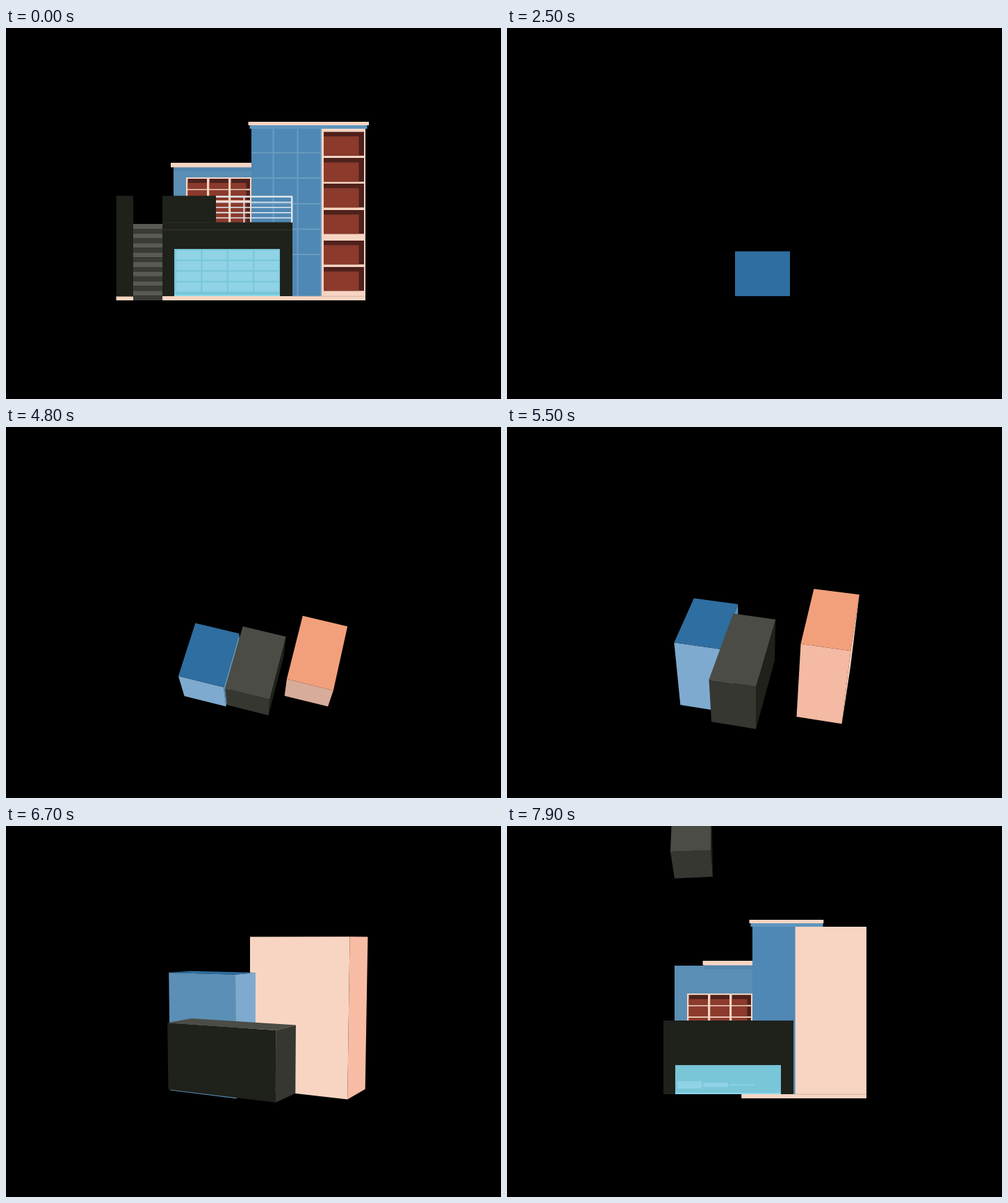
Recreate the animation shown at these times as an HTML page with a canvas. Size 712 by 534 pixels, loop 8000 ms.

```html
<!DOCTYPE html>
<html lang="en">
<head>
<meta charset="utf-8">
<title>House assembly</title>
<style>
  html, body { margin: 0; width: 100%; height: 100%; overflow: hidden; background: #000; }
  canvas { display: block; }
</style>
</head>
<body>
<canvas id="stage" width="712" height="534"></canvas>
<script>
const ctx = document.getElementById('stage').getContext('2d');
const LOOP = 8000, CUT = 1100, SPLIT = 2800, ORBIT = 3700, DETAIL = 7380;
const CX = 356, CY = 267, EYE = 119;
const PEACH = '#f8d5c3', BLUE = '#5b8fb5', TALL = '#4f88b4', DARK = '#1f211b';

const clamp = v => Math.max(0, Math.min(1, v));
const easeOut = v => 1 - (1 - clamp(v)) ** 2;
const smooth = v => (v = clamp(v), v * v * (3 - 2 * v));

function rect(x, y, w, h, color) {
  ctx.fillStyle = color;
  ctx.fillRect(x, y, w, h);
}

function poly(points, color) {
  ctx.fillStyle = color;
  ctx.beginPath();
  points.forEach(([x, y]) => ctx.lineTo(x, y));
  ctx.fill();
}

// Pose keys; camera: yaw, pitch, extra distance, perspective
const times = [3700, 4800, 5300, 6100, 6700, 7200];
const camera = [
  [90, 90, -29, 1], [104.5, 65.6, 177, 1], [103, 47, 240, 1],
  [91, 19.5, 303, 1], [28, 6, 133, 1], [0, 0, 0, 0]
];
// Boxes: x, width, z, depth, height
const blue = {
  top: '#2f6ea0', side: '#7faacf', front: BLUE,
  keys: [[53.5, 66.5, 23, 79, 90], [39, 98, 15, 77, 108], [25, 115, 24, 80, 140],
    [5, 130, 29, 80, 182], [-90, 118, 46, 63, 185], [-115, 112, 46, 63, 185]]
};
const gray = {
  top: '#4b4c45', side: '#363731', front: DARK,
  keys: [[53.5, 66.5, -51, 79, 90], [19, 115, -62, 76, 94], [0, 160, -45, 79, 102],
    [-25, 205, -15, 80, 112], [-97, 189, 35.5, 69, 106], [-131, 187, 36, 69, 106]]
};
const peach = {
  top: '#f2a07b', side: '#f8bca4', front: PEACH,
  keys: [[53.5, 66.5, -125, 79, 90], [-27, 119, -160, 79, 92], [-25, 140, -188, 80, 150],
    [-3, 164, -141, 80, 240], [13, 164, -44, 80, 240], [-3, 164, -44, 80, 241]]
};

// Smooth spline through the keys, at rest at both ends
function sample(keys, t) {
  const last = times.length - 1;
  if (t >= times[last]) return keys[last];
  let i = 0;
  while (t >= times[i + 1]) i++;
  const span = times[i + 1] - times[i], u = (t - times[i]) / span;
  return keys[i].map((a, c) => {
    const b = keys[i + 1][c];
    const slope = n => n === 0 || n === last ? 0 :
      (keys[n + 1][c] - keys[n - 1][c]) / (times[n + 1] - times[n - 1]) * span;
    return a + (b - a) * u * u * (3 - 2 * u) +
      slope(i) * u * (1 - u) ** 2 - slope(i + 1) * u * u * (1 - u);
  });
}

function projector([yaw, pitch, far, persp]) {
  const a = yaw * Math.PI / 180, p = pitch * Math.PI / 180;
  const sa = Math.sin(a), ca = Math.cos(a), sp = Math.sin(p), cp = Math.cos(p);
  return (x, y, z) => {
    const u = x * ca - z * sa, n = x * sa + z * ca, h = y - EYE;
    const s = 1 / (1 + (far - h * sp - n * cp) * persp / 1000);
    return [CX + u * s, CY - (h * cp - n * sp) * s];
  };
}

// Corner bits: 1 = x, 2 = y, 4 = z
const faces = [['front', [1, 0, 2, 3]], ['front', [4, 5, 7, 6]], ['side', [5, 1, 3, 7]], ['top', [6, 7, 3, 2]]];

function drawBox(box, t, project) {
  const [x, w, z, d, h] = sample(box.keys, t);
  const corner = i => project(x + (i & 1 ? w : 0), i & 2 ? h : 0, z + (i & 4 ? d : 0));
  for (const [name, ids] of faces) {
    const pts = ids.map(corner);
    const area = pts.reduce((sum, [px, py], i) => {
      const [qx, qy] = pts[(i + 1) % 4];
      return sum + px * qy - qx * py;
    }, 0);
    if (area < 0) poly(pts, box[name]);
  }
}

function drawBlocks(t) {
  const project = projector(sample(camera, t));
  const m = clamp((5600 - t) / 800);
  peach.side = `rgb(${248 - 32 * m},${188 - 16 * m},${164 - 10 * m})`;
  const order = t < 4500 ? [gray, peach, blue] : [peach, blue, gray];
  order.forEach(box => drawBox(box, t, project));
}

function drawTiles(t) {
  const h = 66.5 * easeOut((t - CUT) / 1700);
  const shift = 74 * easeOut((t - SPLIT) / 900);
  const y = 353.7 - h / 2;
  if (t > SPLIT) {
    rect(328, y, 79, h, gray.top);
    rect(328 + shift, y, 79, h, peach.top);
  }
  rect(328 - shift, y, 79, h, blue.top);
}

function drawWindow(y) {
  rect(259, y, 94, 70, PEACH);
  for (let r = 0; r < 4; r++) for (let c = 0; c < 3; c++)
    rect(261.5 + c * 31, y + 2 + r * 16.5, 27.5, 14.5, r && c < 2 ? '#8b3a2c' : '#4f211c');
  for (let c = 0; c < 3; c++) {
    const w = c < 2 ? 27.5 : 22;
    rect(261.5 + c * 31, y + 8, w, 8.5, '#8b3a2c');
    for (let r = 1; r < 4; r++) rect(261.5 + c * 31, y + 2 + r * 16.5, w, 14.5, '#8b3a2c');
  }
}

function drawGarage(grow, t) {
  rect(242, 386 - 68 * grow, 152, 68 * grow, '#79c6d9');
  for (let i = 0; i < 16; i++) {
    const f = clamp((t - 7780 - i * 50) / 150), row = 3 - (i >> 2);
    const h = 13.2 * f;
    rect(245 + i % 4 * 37.4, 326.7 + row * 15.3 - h / 2, 35.3, h, '#90d3e6');
  }
  rect(242, 384, 152, 2, '#8ed9ea');
}

function drawTowerWindows() {
  [149.5, 187, 224, 262, 306, 344].forEach(y => {
    rect(457, y, 58, 34.3, '#4f211c');
    rect(457, y + 6.5, 50.5, 27.8, '#8b3a2c');
  });
}

function drawExtras() {
  [384.5, 419.5].forEach(x => rect(x - 1, 145, 2, 241, '#6a9cc0'));
  [179.5, 216, 253, 289.5, 326].forEach(y => rect(353, y - 1, 100, 2, '#6a9cc0'));
  rect(452, 145, 2, 241, '#6a9cc0');
  drawTowerWindows();
}

function drawTerrace() {
  rect(225, 241.5, 77, 39, DARK);
  rect(225, 279.5, 187, 1, '#2d2f29');
  rect(225, 290, 187, 1, '#34362f');
  rect(158.5, 241.5, 24.5, 145, DARK);
  for (let i = 0; i < 8; i++) {
    const y = 282 + i * 13.75;
    rect(183, y, 42, 7, '#5a5a54');
    rect(183, y + 7, 42, 6.75, '#3a3b36');
  }
  const rail = '#dfe5ea';
  rect(302, 241.5, 110, 2.5, rail);
  for (let i = 1; i < 5; i++) rect(302, 242.5 + i * 7.5, 110, 1.6, rail);
  rect(341.5, 242, 1.8, 38, rail);
  rect(410, 242, 2.4, 38, rail);
}

function drawHouse(p, t, full) {
  rect(241, 201, 112, 185, BLUE);
  rect(353 - 112 * p, 200, 112 * p, 6, '#5386af');
  drawWindow(215 + 68 * (1 - p));
  rect(353 - 116 * p, 194, 116 * p, 6.5, PEACH);
  rect(353, 145, 164, 241, PEACH);
  rect(353, 145, 100 * p, 241, TALL);
  if (full) drawExtras();
  rect(350.5, 140, 169 * p, 5, '#5f96be');
  rect(348.5, 135, 173.5 * p, 5, PEACH);
  rect(225, 280, 187, 106, DARK);
  drawGarage(p, t);
  rect(517 - 292 * p, 386, 292 * p, 6, PEACH);
  if (full) {
    rect(158.5, 386, 24.5, 6, PEACH);
    drawTerrace();
  }
  rect(412, 385.7, 105, .8, '#c5aea3');
}

function drawFallingBlock(t) {
  ctx.save();
  ctx.translate((t - 7900) * .12, (t - 7900) * .4);
  poly([[293, -60], [294, -60], [296, 73], [293, 34]], DARK);
  poly([[239, -60], [293, -60], [293, 35], [235, 37]], gray.top);
  poly([[235, 37], [293, 34.5], [296, 73], [241, 75.5]], gray.side);
  ctx.restore();
}

function draw(t) {
  rect(0, 0, 712, 534, '#000');
  if (t < CUT) drawHouse(1, LOOP * 2, true);
  else if (t < ORBIT) drawTiles(t);
  else if (t < DETAIL) drawBlocks(t);
  else {
    drawHouse(smooth((t - DETAIL) / 900), t, false);
    drawFallingBlock(t);
  }
}

const start = performance.now();
function tick() {
  const t = (performance.now() - start) % LOOP;
  draw(Math.floor(t / 100) * 100);
  requestAnimationFrame(tick);
}
tick();
</script>
</body>
</html>
```
